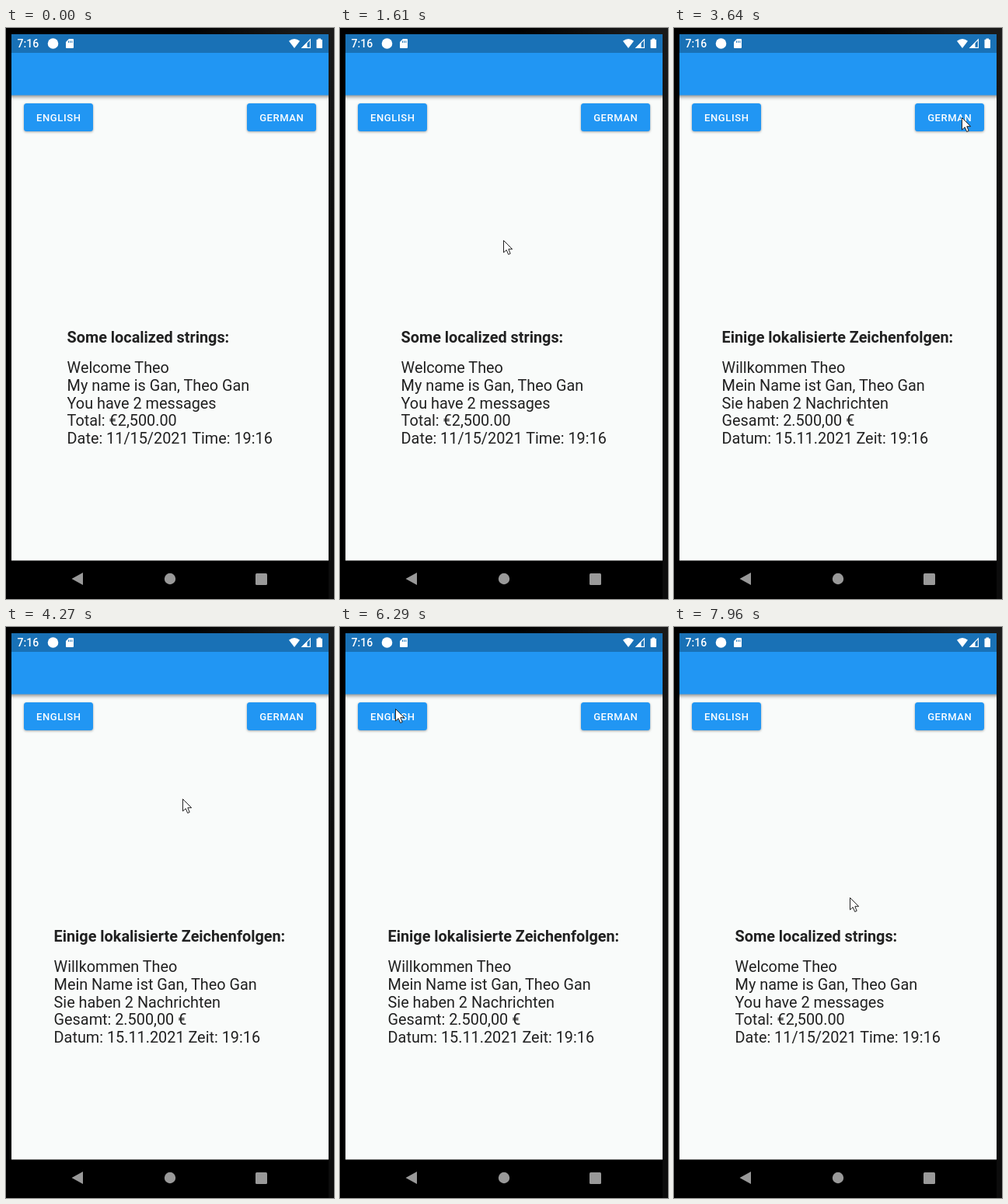
Animation of 422 by 735 pixels, one loop 7990 ms. Source, as an HTML page:

```html
<!DOCTYPE html>
<html lang="en">
<head>
<meta charset="utf-8">
<title>Localization demo</title>
<style>
  html, body { margin: 0; height: 100%; overflow: hidden; background: #000; }
  svg { display: block; font-family: Roboto, sans-serif; }
  .button { fill: #2196f3; filter: drop-shadow(0 1.5px 1.4px #0005); }
  .label { font-size: 13px; font-weight: 500; letter-spacing: .6px; fill: #fff; }
  .copy { font-size: 19.83px; fill: #212121; }
  .title { font-weight: 700; }
</style>
</head>
<body>
<svg width="422" height="735" viewBox="0 0 422 735">
  <defs>
    <clipPath id="screen"><path d="M7 8H415V685.5H7Z"/></clipPath>
    <clipPath id="buttons">
      <rect x="23" y="97" width="89" height="36" rx="3.5"/>
      <rect x="310" y="97" width="89" height="36" rx="3.5"/>
    </clipPath>
    <linearGradient id="topEdge">
      <stop offset=".55"/><stop offset=".9" stop-color="#1a1a1a"/>
    </linearGradient>
    <linearGradient id="sideEdge" x2="0" y2="1">
      <stop stop-color="#1a1a1a"/><stop offset=".35" stop-color="#0c0c0c"/>
    </linearGradient>
  </defs>
  <rect width="422" height="735"/>
  <rect width="422" height="8" fill="url(#topEdge)"/>
  <rect x="415" y="8" width="7" height="727" fill="url(#sideEdge)"/>

  <g clip-path="url(#screen)">
    <path fill="#f9fbfa" d="M7 8H415V686H7Z"/>
    <path fill="#2196f3" d="M0 20H422V86.500H0Z" style="filter:drop-shadow(0 2px 2.5px #0007)"/>
    <path fill="#1971b6" d="M7 8H415V32H7Z"/>
  </g>

  <g fill="#fff">
    <text x="14.5" y="25" font-size="14" font-weight="500">7:16</text>
    <circle cx="60.5" cy="20" r="6.8"/>
    <path d="M81 14H86Q87 14 87 15V25Q87 26 86 26H78Q77 26 77 25V18Z"/>
    <path stroke="#1971b6" d="M80.5 16.5V19M82.7 16.5V19M84.9 16.5V19"/>
    <path d="M364 16.7Q371 11.3 378 16.7L371 26Z"/>
    <path fill="none" stroke="#fff" stroke-width="1.1" d="M391.4 14.8V25.4H381Z"/>
    <path d="M380 26L387.5 18.5V26Z"/>
    <path d="M401.5 13.5H405V14.8H406.2Q407 14.8 407 15.6V25.2Q407 26 406.2 26H400.3Q399.5 26 399.5 25.2V15.6Q399.5 14.8 400.3 14.8H401.5Z"/>
  </g>

  <rect class="button" x="23" y="97" width="89" height="36" rx="3.5"/>
  <rect class="button" x="310" y="97" width="89" height="36" rx="3.5"/>
  <g clip-path="url(#buttons)"><circle id="ripple" fill="#fff"/></g>
  <g class="label" text-anchor="middle">
    <text x="67.8" y="120">ENGLISH</text>
    <text x="354.8" y="120">GERMAN</text>
  </g>

  <g id="copy" class="copy"></g>

  <g fill="#999">
    <path d="M84.5 709L99 701V717Z"/>
    <circle cx="211" cy="709" r="7.2"/>
    <rect x="321" y="702" width="15" height="15" rx="1.5"/>
  </g>

  <path id="cursor" fill="#fff" stroke="#222" stroke-linejoin="round"
    d="M.5 .5V16L4.2 12.7 6.7 18.5 9.2 17.4 6.8 11.7H11.7Z"/>
</svg>
<script>
const LOOP = 7990;
const $ = id => document.getElementById(id);
const english = {
  x: 78.6,
  lines: ['Some localized strings:', 'Welcome Theo', 'My name is Gan, Theo Gan',
    'You have 2 messages', 'Total: €2,500.00', 'Date: 11/15/2021 Time: 19:16']
};
const german = {
  x: 61.6,
  lines: ['Einige lokalisierte Zeichenfolgen:', 'Willkommen Theo', 'Mein Name ist Gan, Theo Gan',
    'Sie haben 2 Nachrichten', 'Gesamt: 2.500,00 €', 'Datum: 15.11.2021 Zeit: 19:16']
};
const presses = [
  { at: 3100, x: 370, y: 115, lang: german },
  { at: 6290, x: 71, y: 105, lang: english }
];

const smooth = u => u * u * (3 - 2 * u);
const easeOut = power => u => 1 - (1 - u) ** power;
// start, end, from, control, to, easing
const moves = [
  [830, 1610, [189, 735], [230, 430], [210, 273], easeOut(2)],
  [2240, 2930, [210, 273], [290, 194], [370, 115], smooth],
  [3690, 4560, [370, 115], [253, 149], [203, 268], easeOut(1.4)],
  [5230, 5960, [203, 268], [137, 186], [71, 105], smooth],
  [6650, 7390, [71, 105], [160, 174], [225, 296], easeOut(1.1)],
  [7790, 7960, [225, 296], [225, 322], [226, 348], u => u * u]
];

const clamp = v => Math.min(1, Math.max(0, v));

function cursorAt(t) {
  const [start, end, a, c, b, ease] = moves.findLast(m => m[0] <= t) || moves[0];
  const s = ease(clamp((t - start) / (end - start)));
  return a.map((v, i) => Math.round((1 - s) ** 2 * v + 2 * s * (1 - s) * c[i] + s * s * b[i]));
}

let shown;
function showText(lang) {
  if (lang === shown) return;
  shown = lang;
  $('copy').innerHTML = lang.lines.map((line, i) => i
    ? `<text x="${lang.x}" y="${421.25 + 22.75 * i}">${line}</text>`
    : `<text class="title" x="${lang.x}" y="405">${line}</text>`).join('');
}

function drawRipple(t) {
  const press = presses.findLast(p => p.at <= t);
  const age = press ? t - press.at : Infinity;
  const ripple = $('ripple');
  ripple.setAttribute('opacity', 0.24 * clamp(age / 75) * clamp((480 - age) / 150));
  if (!press) return;
  ripple.setAttribute('cx', press.x);
  ripple.setAttribute('cy', press.y);
  ripple.setAttribute('r', 15 + 80 * smooth(clamp(age / 300)));
}

function draw(t) {
  const press = presses.findLast(p => p.at + 130 <= t);
  showText(press ? press.lang : english);
  drawRipple(t);
  $('cursor').setAttribute('transform', `translate(${cursorAt(t)})`);
  $('cursor').setAttribute('visibility', t < 850 ? 'hidden' : 'visible');
}

const began = performance.now();
function tick() {
  draw((performance.now() - began) % LOOP);
  requestAnimationFrame(tick);
}
tick();
</script>
</body>
</html>
```
